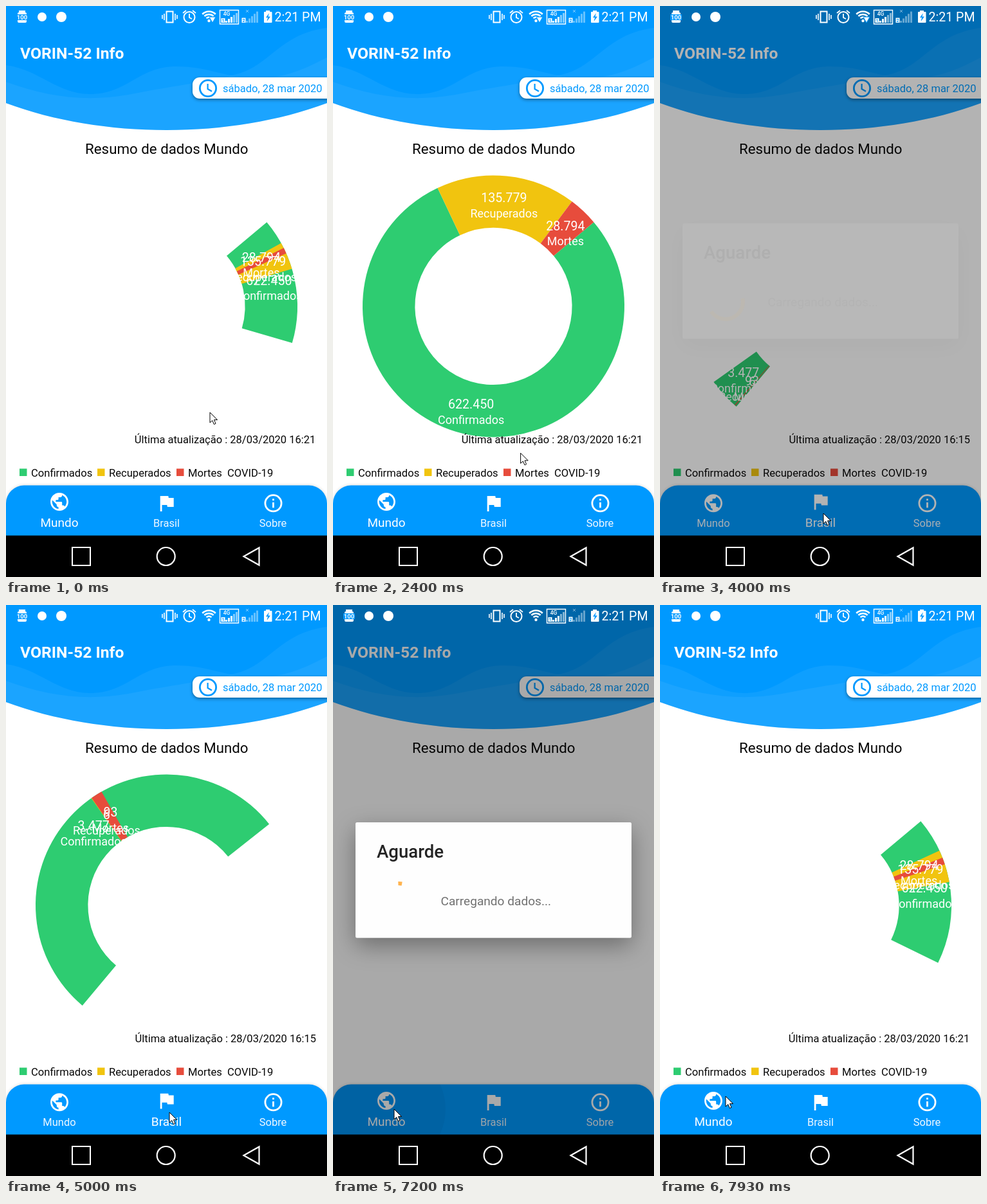
An HTML page with a canvas that plays this animation: 499 px wide and 888 px high, repeating every 8 s.

```html
<!DOCTYPE html>
<html lang="pt">
<head>
<meta charset="utf-8">
<style>
html, body { margin: 0; width: 100%; height: 100%; overflow: hidden; background: #fff; }
canvas { display: block; }
</style>
</head>
<body>
<canvas id="stage" width="499" height="888"></canvas>
<script>
const c = document.getElementById('stage').getContext('2d');
const LOOP = 8000, SPIN_UP = 1978;
const BLUE = '#0099ff', GREEN = '#2ecc71', YELLOW = '#f1c40f', RED = '#e74c3c';
const COLORS = [GREEN, YELLOW, RED];
const LABELS = ['Confirmados', 'Recuperados', 'Mortes'];
const WORLD = { values: [622450, 135779, 28794], rot: -40, time: '16:21', right: 481.3 };
const BRAZIL = { values: [3477, 6, 93], rot: 130, time: '16:15', right: 482 };
const CHARTS = [
  { data: WORLD, start: -390, end: 3490 },
  { data: BRAZIL, start: 3918, end: 7065 },
  { data: WORLD, start: 7472, end: LOOP }
];
const DIALOGS = [{ open: 3525, close: 3860 }, { open: 7074, close: 7415 }];
const RIPPLES = [{ t: 3470, x: 249.5 }, { t: 7040, x: 83 }];
const WIFI_BUSY = [[0, 1000], [2070, 2600], [3800, 4800], [6070, 6600]];
const CURSOR = [[0, 317, 632], [2040, 317, 632], [2870, 254, 789], [6030, 254, 789],
  [6670, 95, 784], [7800, 95, 784], [7930, 102, 764], [LOOP, 102, 764]];

const ICONS = {
  globe: 'M12 2C6.48 2 2 6.48 2 12s4.48 10 10 10 10-4.48 10-10S17.52 2 12 2zm-1 17.93c-3.95-.49-7-3.85-7-7.93 0-.62.08-1.21.21-1.79L9 15v1c0 1.1.9 2 2 2v1.93zm6.9-2.54c-.26-.81-1-1.39-1.9-1.39h-1v-3c0-.55-.45-1-1-1H8v-2h2c.55 0 1-.45 1-1V7h2c1.1 0 2-.9 2-2v-.41c2.93 1.19 5 4.06 5 7.41 0 2.08-.8 3.97-2.1 5.39z',
  flag: 'M14.4 6L14 4H5v17h2v-7h5.6l.4 2h7V6z'
};

const rad = deg => deg * Math.PI / 180;
const clamp = x => Math.max(0, Math.min(1, x));
const smooth = x => x * x * (3 - 2 * x);

function text(str, x, y, size, color, align = 'left', weight = 400) {
  c.font = `${weight} ${size}px Roboto, sans-serif`;
  c.textAlign = align;
  c.fillStyle = color;
  c.fillText(str, x, y);
}
function rect(x, y, w, h, color) {
  c.fillStyle = color;
  c.fillRect(x, y, w, h);
}
function round(x, y, w, h, r, color) {
  c.beginPath();
  c.roundRect(x, y, w, h, r);
  c.fillStyle = color;
  c.fill();
}
function path(d, fill, stroke, width) {
  const p = new Path2D(d);
  if (fill) { c.fillStyle = fill; c.fill(p); }
  if (stroke) { c.strokeStyle = stroke; c.lineWidth = width; c.stroke(p); }
}
function arc(x, y, r, a, b, color, width) {
  c.beginPath();
  c.arc(x, y, r, rad(a), rad(b));
  c.strokeStyle = color;
  c.lineWidth = width;
  c.stroke();
}
function dot(x, y, r, color) {
  c.beginPath();
  c.arc(x, y, r, 0, 7);
  c.fillStyle = color;
  c.fill();
}
function icon(d, x, y) {
  c.save();
  c.translate(x - 16.8, y - 16.8);
  c.scale(1.4, 1.4);
  path(d, '#fff');
  c.restore();
}
function shadow(color, blur, y) {
  c.shadowColor = color;
  c.shadowBlur = blur;
  c.shadowOffsetY = y;
}

function header() {
  c.save();
  c.clip(new Path2D('M0 0H499V151C349 207 150 207 0 151Z'));
  rect(0, 0, 499, 200, BLUE);
  path('M0 92C50 98 80 137 130 137C190 137 205 94 265 94C320 94 345 115 400 112C440 110 470 95 499 80V200H0Z', 'rgba(255,255,255,.055)');
  path('M0 118C60 140 120 150 190 138C270 122 320 118 365 104C410 90 430 42 499 34V200H0Z', 'rgba(255,255,255,.055)');
  c.restore();
  text('VORIN-52 Info', 22, 82, 24.7, '#fff', 'left', 700);
  c.save();
  shadow('rgba(0,0,0,.4)', 5, 2);
  round(290, 111, 220, 33, [11, 0, 0, 11], '#fff');
  c.restore();
  arc(314, 128, 12.6, 0, 360, BLUE, 2.8);
  path('M313.6 121V129L320 132.8', null, BLUE, 2.2);
  text('sábado, 28 mar 2020', 337, 134, 16.5, BLUE);
  text('Resumo de dados Mundo', 249.8, 230, 22.3, '#080808', 'center');
}

// Slice offsets scale with the squared phase, sweeps with the phase itself.
function chart({ values, rot, time, right }, p) {
  const X = 249.5, Y = 467;
  const total = values.reduce((a, b) => a + b);
  const sweeps = values.map(v => v / total * 360);
  const starts = [0, sweeps[0], sweeps[0] + sweeps[1]];
  sweeps.forEach((s, i) => {
    const a = rot + starts[i] * p * p;
    arc(X, Y, 162.8, a, a + s * p, COLORS[i], 81.4);
  });
  sweeps.forEach((s, i) => {
    const a = rad(rot + (starts[i] * p + s / 2) * p);
    const x = X + 162.8 * Math.cos(a), y = Y + 162.8 * Math.sin(a);
    text(values[i].toLocaleString('de-DE'), x, y, 19.6, '#fff', 'center');
    text(LABELS[i], x, y + 23.5, 18, '#fff', 'center');
  });
  text('Última atualização : 28/03/2020 ' + time, right, 680, 16.5, '#080808', 'right');
  [21, 142, 265].forEach((x, i) => {
    rect(x, 719.5, 11.5, 11.5, COLORS[i]);
    text(LABELS[i], x + 18, 732, 16.6, '#080808');
  });
  text('COVID-19', 344, 732, 16.6, '#080808');
}

function tabs(t) {
  c.save();
  shadow('rgba(0,0,0,.12)', 4, -1);
  round(0, 745.5, 499, 80, [28, 28, 0, 0], BLUE);
  c.restore();
  c.save();
  c.beginPath();
  c.roundRect(0, 745.5, 499, 80, [28, 28, 0, 0]);
  c.clip();
  for (const r of RIPPLES) {
    const age = t - r.t;
    if (age < 0 || age > 480) continue;
    const alpha = .04 * clamp(age / 60) * clamp((480 - age) / 150);
    dot(r.x, 784, 92 * Math.sqrt(clamp(age / 160)), `rgba(0,0,0,${alpha})`);
  }
  c.restore();
  const active = t >= 3490 && t < 7065 ? 1 : 0;
  const lift = i => i === active ? 771 : 773.3;
  icon(ICONS.globe, 83, lift(0));
  icon(ICONS.flag, 249.5, lift(1));
  arc(415.5, 773.3, 12.6, 0, 360, '#fff', 2.8);
  rect(414.1, 766.3, 2.8, 2.8, '#fff');
  rect(414.1, 771.9, 2.8, 8.4, '#fff');
  ['Mundo', 'Brasil', 'Sobre'].forEach((s, i) =>
    text(s, [83, 249.5, 415][i], 809.6, i === active ? 19 : 16.5, i === active ? '#fff' : '#f0f8ff', 'center'));
}

function spinner(age) {
  const k = clamp(age / 1333);
  const start = -94 + k * 90 + age * 720 / 4444;
  arc(102, 460, 27, start, start + 12 + 258 * smooth(clamp(k * 2)), '#ffb24d', 6);
}

function dialog(t) {
  for (const { open, close } of DIALOGS) {
    if (t < open || t > close + 280) continue;
    const dim = .6 * clamp((t - open) / 225) * clamp(1 - (t - close) / 280);
    rect(0, 0, 499, 824, `rgba(0,0,0,${dim})`);
    const k = 1 - clamp((t - open) / 140);
    const alpha = (1 - k * k) * clamp(1 - (t - close) / 150);
    if (alpha <= 0) continue;
    c.save();
    c.globalAlpha = alpha;
    // the shadow stays outside the translucent card
    c.save();
    c.clip(new Path2D('M0 0H499V824H0ZM35 338H464V517.5H35Z'), 'evenodd');
    shadow('rgba(0,0,0,.36)', 36, 12);
    round(35, 338, 429, 179.5, 2.5, '#fff');
    c.restore();
    round(35, 338, 429, 179.5, 2.5, '#fff');
    text('Aguarde', 68, 393, 27.6, '#222', 'left', 500);
    text('Carregando dados...', 167.5, 467, 19.1, '#707070');
    spinner(Math.max(0, t - open - 115));
    c.restore();
  }
}

function statusBar(t) {
  const W = '#fff';
  // battery level badge
  rect(20, 7, 10, 4, W);
  round(18, 10, 14, 16, 2, W);
  rect(16, 13, 18, 9, BLUE);
  text('100', 25, 21, 9.5, W, 'center', 700);
  dot(56, 17, 7, W);
  dot(86, 17, 8, W);
  // vibrate
  path('M249.5 8.5H259.5V25.5H249.5Z', null, W, 2);
  path('M246 12V22M243 14V20M263 12V22M266 14V20', null, W, 1.6);
  // alarm
  arc(285, 17.5, 8.5, 0, 360, W, 2);
  path('M285 12V18L289 20M275 11L280 7M295 11L290 7', null, W, 1.8);
  // wifi
  for (const r of [5.5, 10, 14.5]) arc(315.5, 23, r, 225, 315, W, 2.6);
  dot(315.5, 23, 2.2, W);
  if (WIFI_BUSY.some(([a, b]) => t >= a && t < b)) {
    path('M316 17H326L321 26Z', W, BLUE, 1);
  }
  // mobile signals
  path('M332.5 6.5H361.5V28H332.5Z', null, W, 1.4);
  text('4G', 343, 14.5, 8.5, W, 'center', 500);
  for (let i = 0; i < 5; i++) {
    rect(341 + i * 4, 23 - i * 3, 3, 3 + i * 3, i < 3 ? W : 'rgba(255,255,255,.5)');
    rect(373 + i * 4, 23 - i * 3.6, 3, 3 + i * 3.6, 'rgba(255,255,255,.4)');
  }
  rect(334.5, 19, 6, 7, W);
  rect(366.5, 18.5, 6, 7.5, W);
  text('1', 337.5, 25.4, 7, BLUE, 'center', 700);
  text('2', 369.5, 25.2, 7, BLUE, 'center', 700);
  path('M373 6L377 10M377 6L373 10', null, 'rgba(255,255,255,.5)', 1);
  // battery
  rect(404, 7, 6, 3, W);
  round(401, 9, 12.5, 17, 1, W);
  path('M409 11L404 18H407L405.5 24L411 16.5H407.5Z', BLUE);
  text('2:21 PM', 489.5, 24, 19.6, W, 'right');
}

function softKeys() {
  rect(0, 823.5, 499, 65, '#000');
  path('M103 842H131V870H103Z', null, '#fff', 2);
  arc(248.7, 856, 14, 0, 360, '#fff', 2.2);
  path('M369.5 856L393.5 842.5V869.5Z', null, '#fff', 2.2);
}

function cursor(t) {
  const i = CURSOR.findIndex((k, n) => n && t <= k[0]);
  const [t0, x0, y0] = CURSOR[i - 1], [t1, x1, y1] = CURSOR[i];
  const k = smooth((t - t0) / (t1 - t0));
  c.save();
  c.translate(x0 + (x1 - x0) * k, y0 + (y1 - y0) * k);
  path('M0 0V16L3.8 12.6L6.4 18.6L9 17.4L6.5 11.6H11.6Z', '#fff', '#000', 1);
  c.restore();
}

function draw(t) {
  rect(0, 0, 499, 888, '#fff');
  header();
  const shown = CHARTS.find(s => t >= s.start && t < s.end);
  if (shown) chart(shown.data, clamp((t - shown.start) / SPIN_UP));
  else text('No chart data available.', 249.5, 495.5, 16.5, '#f7bd33', 'center');
  tabs(t);
  dialog(t);
  statusBar(t);
  softKeys();
  cursor(t);
}

function tick() {
  draw(performance.now() % LOOP);
  requestAnimationFrame(tick);
}
tick();
</script>
</body>
</html>
```
